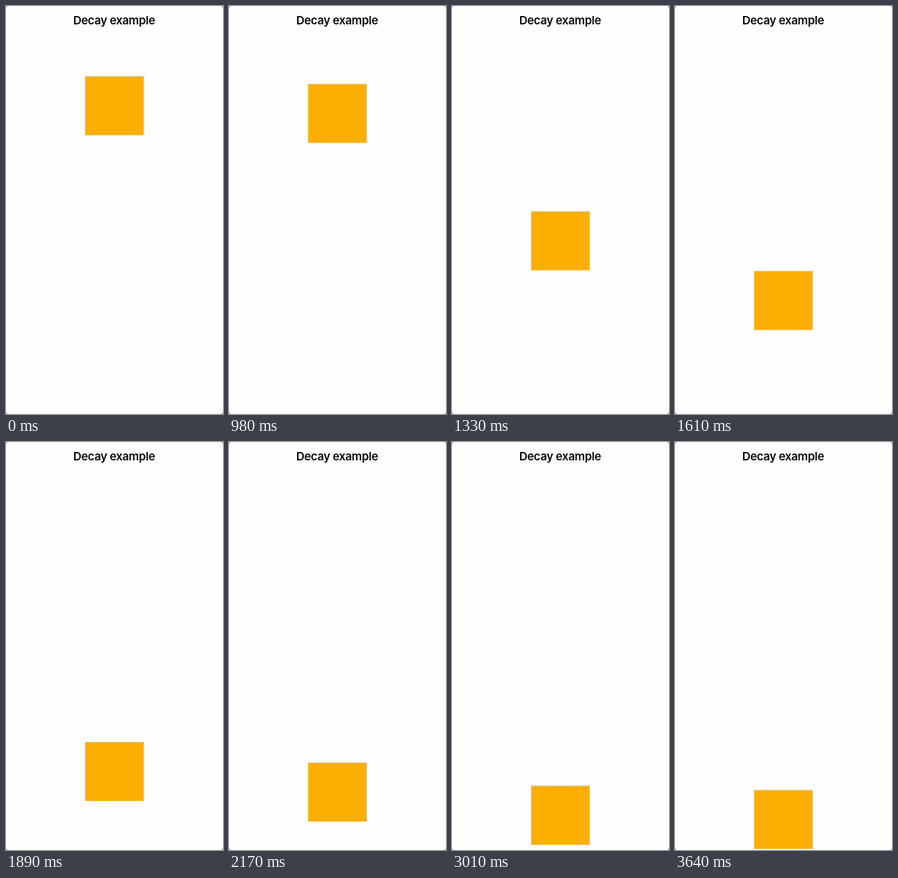
An HTML page with a canvas for the animation above (4.34 s loop, 284 by 532 pixels).

```html
<!DOCTYPE html>
<html lang="en">
<head>
<meta charset="utf-8">
<title>Decay example</title>
<style>
  html, body { margin: 0; width: 100%; height: 100%; overflow: hidden; background: #fefefe; }
  canvas { display: block; }
</style>
</head>
<body>
<canvas id="stage"></canvas>
<script>
const W = 284, H = 532;
const LOOP = 4340, START = 980, STEP = 70, LAST = 38;
const REST_Y = 456.4, SIZE = 76.5, LEFT = 103.5;

const canvas = document.getElementById('stage');
const ctx = canvas.getContext('2d');
const ratio = window.devicePixelRatio || 1;
canvas.width = W * ratio;
canvas.height = H * ratio;
canvas.style.width = W + 'px';
canvas.style.height = H + 'px';
ctx.scale(ratio, ratio);

function rect(color, x, y, w, h) {
  ctx.fillStyle = color;
  ctx.fillRect(x, y, w, h);
}

// Held still, dragged for one step, then released into exponential decay.
function boxTop(t) {
  if (t < START) return 92;
  const n = Math.min(LAST, Math.floor((t - START) / STEP));
  if (n === 0) return 102;
  return REST_Y - 188.3 * Math.exp(-(n - 5) * 2 / 15);
}

function drawBox(y) {
  rect('#fbaf02', LEFT, y, SIZE, SIZE);
  rect('#d3bd8c', LEFT, y - 0.5, SIZE, 1);
  rect('#d3bd8c', LEFT + SIZE - 0.5, y - 0.5, 1, SIZE + 0.5);
}

function drawCorners() {
  for (const x of [0, W - 1])
    for (const y of [0, H - 1]) {
      rect('#777', x, y, 1, 1);
      rect('#ccc', x ? x - 1 : 1, y, 1, 1);
      rect('#ccc', x, y ? y - 1 : 1, 1, 1);
    }
}

function drawTitle() {
  ctx.font = '600 15px Inter, "Liberation Sans", sans-serif';
  ctx.letterSpacing = '-0.3px';
  ctx.textAlign = 'center';
  ctx.fillStyle = '#080808';
  ctx.fillText('Decay example', 141.5, 24.3);
}

function draw(t) {
  rect('#fefefe', 0, 0, W, H);
  drawTitle();
  drawBox(boxTop(t));
  drawCorners();
}

const begin = performance.now();
function frame() {
  draw((performance.now() - begin) % LOOP);
  requestAnimationFrame(frame);
}
draw(0);
requestAnimationFrame(frame);
</script>
</body>
</html>
```
